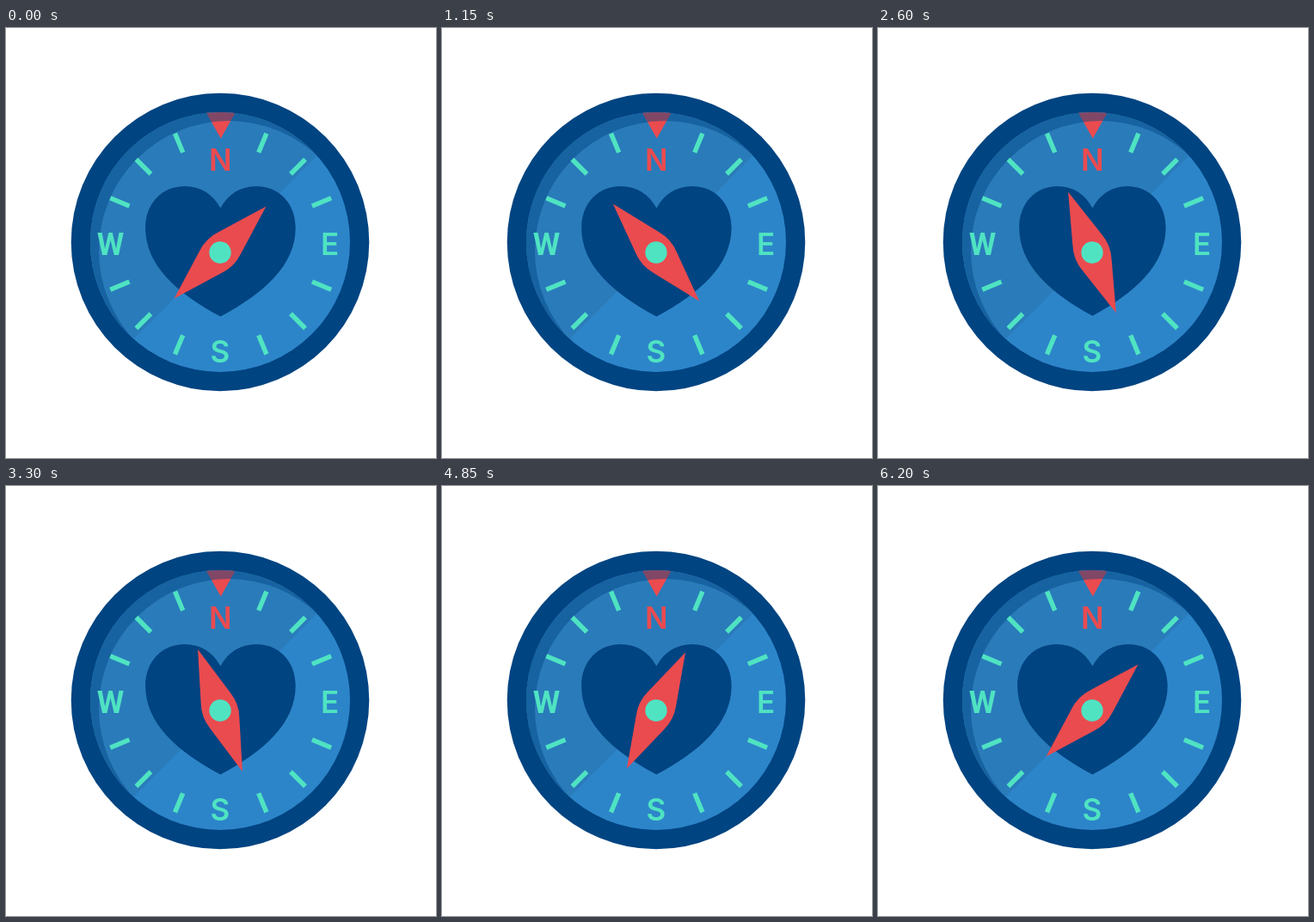
These frames come from a looping animation (500x500 px, 6300 ms). An HTML page with a canvas:

```html
<!DOCTYPE html>
<html>
<head>
<meta charset="utf-8">
<style>
html, body { margin: 0; width: 100%; height: 100%; overflow: hidden; background: #fff; }
canvas { display: block; }
</style>
</head>
<body>
<canvas id="stage" width="500" height="500"></canvas>
<script>
const ctx = document.getElementById('stage').getContext('2d');
const LOOP = 6300, STEP = 50, BEAT = 1600;
const NAVY = '#004481', RED = '#ea4b4f', MINT = '#4fe3c2';

// needle angle in degrees at each turning point
const SWING = [[0, 45], [1200, -42], [2100, 15], [2900, -38], [4200, 45], [5200, 20], [6200, 45]];

const clamp = x => Math.min(1, Math.max(0, x));
const smooth = (t, a, b) => { const x = clamp((t - a) / (b - a)); return x * x * (3 - 2 * x); };

function needleAngle(t) {
  let i = 0;
  while (i < SWING.length - 2 && t > SWING[i + 1][0]) i++;
  const [t0, a0] = SWING[i], [t1, a1] = SWING[i + 1];
  const x = clamp((t - t0) / (t1 - t0));
  return a0 + (a1 - a0) * (1 - Math.cos(Math.PI * x)) / 2;
}

// rise to 1, fall to `low`, settle back to 0
function pulse(t, up0, up1, down0, down1, low) {
  return smooth(t, up0, up1) - (1 - low) * smooth(t, down0, down1) - low * smooth(t, down1, 1180);
}

function disc(x, y, r, color) {
  ctx.fillStyle = color;
  ctx.beginPath();
  ctx.arc(x, y, r, 0, 2 * Math.PI);
  ctx.fill();
}

function poly(points, color) {
  ctx.fillStyle = color;
  ctx.beginPath();
  points.forEach(([x, y]) => ctx.lineTo(x, y));
  ctx.closePath();
  ctx.fill();
}

function letter(s, x, y, color, font) {
  ctx.font = font;
  ctx.fillStyle = color;
  const m = ctx.measureText(s);
  ctx.fillText(s,
    x + (m.actualBoundingBoxLeft - m.actualBoundingBoxRight) / 2,
    y + (m.actualBoundingBoxAscent - m.actualBoundingBoxDescent) / 2);
}

function drawFace() {
  disc(249, 249, 173.3, NAVY);
  ctx.save();
  ctx.beginPath();
  ctx.arc(249, 249, 151, 0, 2 * Math.PI);
  ctx.clip();
  ctx.fillStyle = '#2d85c9';
  ctx.fillRect(90, 90, 320, 320);
  poly([[90, 90], [420, 90], [90, 420]], '#2a7bba');
  poly([[232, 97], [267.5, 97], [249.7, 128.5]], RED);
  // rim shadow
  ctx.fillStyle = 'rgba(0,68,129,0.45)';
  ctx.beginPath();
  ctx.rect(90, 90, 330, 330);
  ctx.arc(259, 259, 151, 0, 2 * Math.PI);
  ctx.fill('evenodd');
  ctx.restore();
}

function drawHeart(t) {
  const b = t % BEAT;
  const half = 87.3 + 18.7 * pulse(b, 321, 465, 565, 870, -0.18);
  const top = 184 - 14.7 * pulse(b, 306, 501, 640, 920, 0);
  const bottom = 335.5 + 10.8 * pulse(b, 270, 468, 600, 870, -0.1);
  const X = u => 249.4 + half * u;
  const Y = y => top + (bottom - top) * (y - 184) / 151;
  ctx.fillStyle = NAVY;
  ctx.beginPath();
  for (const s of [-1, 1]) {
    const curve = (a, b, c, d, e, f) => ctx.bezierCurveTo(X(s * a), Y(b), X(s * c), Y(d), X(s * e), Y(f));
    ctx.moveTo(X(0), Y(209.5));
    curve(0.1, 193, 0.27, 184, 0.475, 184);
    curve(0.78, 184, 1, 204, 1, 232);
    curve(1, 276, 0.575, 308, 0, 335);
  }
  ctx.fill();
}

function drawMarks() {
  ctx.strokeStyle = MINT;
  ctx.lineWidth = 5.5;
  ctx.beginPath();
  for (let i = 0; i < 16; i++) {
    if (i % 4 === 0) continue;
    const a = i * Math.PI / 8, c = Math.cos(a), s = Math.sin(a);
    ctx.moveTo(249.7 + 115 * c, 251 + 115 * s);
    ctx.lineTo(249.7 + 139 * c, 251 + 139 * s);
  }
  ctx.stroke();
  const inter = '600 35px Inter, sans-serif';
  letter('N', 249, 152.5, RED, inter);
  letter('E', 377, 251, MINT, inter);
  letter('S', 249, 375.5, MINT, inter);
  letter('W', 121.3, 251, MINT, '700 36px Roboto, sans-serif');
}

function drawNeedle(t) {
  ctx.save();
  ctx.translate(249, 261);
  ctx.rotate(needleAngle(t) * Math.PI / 180);
  ctx.fillStyle = RED;
  ctx.beginPath();
  ctx.moveTo(0, -75.5);
  ctx.lineTo(18, -16);
  ctx.quadraticCurveTo(23.5, 0, 18, 16);
  ctx.lineTo(0, 75.5);
  ctx.lineTo(-18, 16);
  ctx.quadraticCurveTo(-23.5, 0, -18, -16);
  ctx.closePath();
  ctx.fill();
  ctx.restore();
  disc(249, 261, 12.7, MINT);
}

function draw(t) {
  ctx.fillStyle = '#fff';
  ctx.fillRect(0, 0, 500, 500);
  drawFace();
  drawHeart(t);
  drawMarks();
  drawNeedle(t);
}

const start = performance.now();
function tick() {
  const t = (performance.now() - start) % LOOP;
  draw(Math.min(LOOP - 2 * STEP, Math.floor(t / STEP) * STEP));
  requestAnimationFrame(tick);
}
tick();
</script>
</body>
</html>
```
